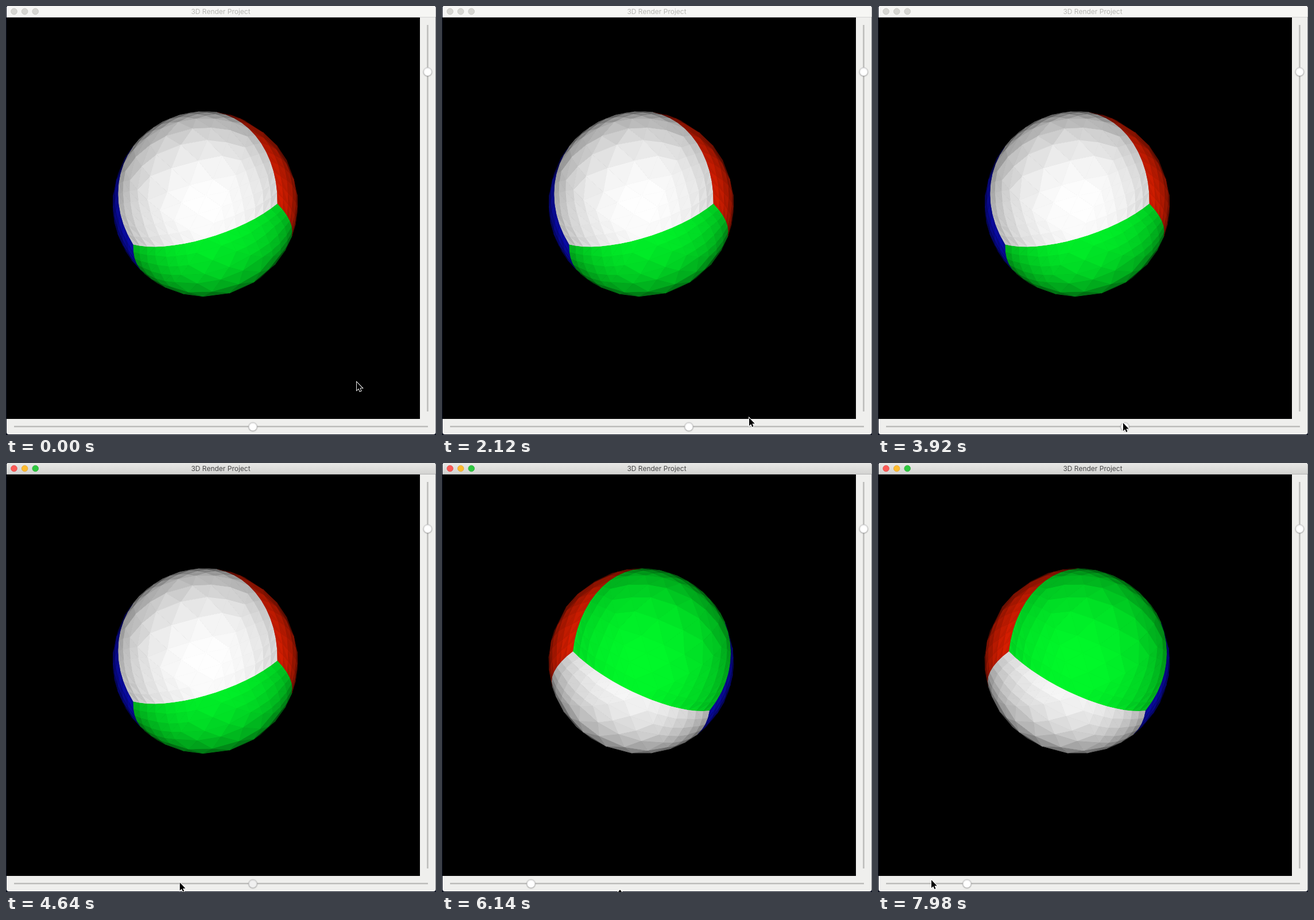
Write an HTML page with a canvas that moves like this. It is 749 by 747 pixels and loops after 8000 ms.

```html
<!DOCTYPE html>
<html lang="en">
<head>
<meta charset="utf-8">
<title>3D Render Project</title>
<style>
  html, body { margin: 0; width: 100%; height: 100%; overflow: hidden; background: #000; }
  canvas { display: block; }
</style>
</head>
<body>
<canvas id="stage" width="749" height="747"></canvas>
<script>
const ctx = document.getElementById('stage').getContext('2d');
const LOOP = 8000, ACTIVATE = 4020, TURN = 5980;
const RADIUS = 161, CENTER = { x: 347, y: 344.8 };
const PITCH = 68;
const WHITE = [255, 255, 255], GREEN = [0, 250, 42], RED = [255, 36, 0], BLUE = [14, 16, 232];

// --- sphere: a tetrahedron split four times, each time pushed out to the sphere
const unit = v => { const l = Math.hypot(...v); return v.map(c => c / l); };
const middle = (a, b) => unit(a.map((c, i) => c + b[i]));

function inflate(faces) {
  return faces.flatMap(({ p: [a, b, c], color }) => {
    const ab = middle(a, b), bc = middle(b, c), ca = middle(c, a);
    return [[a, ab, ca], [b, bc, ab], [c, ca, bc], [ab, bc, ca]].map(p => ({ p, color }));
  });
}

const [A, B, C, D] = [[1, 1, 1], [-1, -1, 1], [-1, 1, -1], [1, -1, -1]].map(unit);
let faces = [
  { p: [A, B, C], color: GREEN },
  { p: [A, C, D], color: WHITE },
  { p: [B, C, D], color: RED },
  { p: [A, B, D], color: BLUE }
];
for (let i = 0; i < 4; i++) faces = inflate(faces);

function rotation(heading, pitch) {
  const h = heading * Math.PI / 180, p = pitch * Math.PI / 180;
  const ch = Math.cos(h), sh = Math.sin(h), cp = Math.cos(p), sp = Math.sin(p);
  return ([x, y, z]) => {
    const depth = z * ch - x * sh;
    return [x * ch + z * sh, y * cp - depth * sp, y * sp + depth * cp];
  };
}

function normal([a, b, c]) {
  const u = b.map((v, i) => v - a[i]), w = c.map((v, i) => v - a[i]);
  const n = unit([u[1] * w[2] - u[2] * w[1], u[2] * w[0] - u[0] * w[2], u[0] * w[1] - u[1] * w[0]]);
  const outward = n[0] * a[0] + n[1] * a[1] + n[2] * a[2] > 0;
  return outward ? n : n.map(v => -v);
}

function facets(heading) {
  const rotate = rotation(heading, PITCH);
  return faces.flatMap(({ p, color }) => {
    const points = p.map(rotate);
    const facing = normal(points)[2];
    if (facing <= 0) return [];
    const shade = facing ** (1 / 2.4);
    const path = new Path2D();
    for (const [x, y] of points) path.lineTo(CENTER.x + x * RADIUS, CENTER.y + y * RADIUS);
    path.closePath();
    return [{ path, fill: `rgb(${color.map(c => Math.floor(c * shade))})` }];
  });
}

const before = facets(208), after = facets(70);

// Outlines go underneath so that no dark seams show between the fills.
function drawSphere(sphere) {
  ctx.lineWidth = 1;
  ctx.lineJoin = 'round';
  for (const { path, fill } of sphere) {
    ctx.strokeStyle = fill;
    ctx.stroke(path);
  }
  for (const { path, fill } of sphere) {
    ctx.fillStyle = fill;
    ctx.fill(path);
  }
}

// --- window
function rect(x, y, w, h, fill) {
  ctx.fillStyle = fill;
  ctx.fillRect(x, y, w, h);
}

function disc(x, y, r, fill, edge) {
  ctx.beginPath();
  ctx.arc(x, y, r, 0, 7);
  ctx.fillStyle = fill;
  ctx.fill();
  ctx.lineWidth = 0.8;
  ctx.strokeStyle = edge;
  ctx.stroke();
}

function thumb(x, y, fill) {
  ctx.save();
  ctx.shadowColor = 'rgba(0,0,0,.3)';
  ctx.shadowBlur = 2;
  ctx.shadowOffsetY = 0.6;
  disc(x, y, 7.2, fill, '#c9c9c9');
  ctx.restore();
}

function drawWindow(active, thumbX, pressed) {
  rect(0, 0, 749, 747, '#0b1020');
  ctx.beginPath();
  ctx.roundRect(1, 0, 747.5, 746, [3, 3, 4, 4]);
  ctx.fillStyle = '#efefed';
  ctx.fill();

  const bar = ctx.createLinearGradient(0, 0, 0, 19);
  bar.addColorStop(0, active ? '#e8e8e6' : '#f6f6f4');
  bar.addColorStop(1, active ? '#d3d3d1' : '#f6f6f4');
  ctx.beginPath();
  ctx.roundRect(1, 0, 747.5, 19, [3, 3, 0, 0]);
  ctx.fillStyle = bar;
  ctx.fill();
  rect(1, 19, 747, 1, active ? '#b4b4b4' : '#d4d4d4');

  const lights = active
    ? [['#fc5b57', '#df4744'], ['#fdbb2e', '#dea034'], ['#2ec840', '#27aa35']]
    : Array(3).fill(['#d6d6d2', '#c2c2be']);
  lights.forEach(([fill, edge], i) => disc(14 + i * 18.6, 9.5, 5.3, fill, edge));

  ctx.font = '12px Inter, sans-serif';
  ctx.textAlign = 'center';
  ctx.fillStyle = active ? '#484848' : '#b6b6b2';
  ctx.fillText('3D Render Project', 374, 14);

  rect(1, 20, 720, 699, '#000');
  rect(14, 731, 721, 2.5, '#bcbcba');
  rect(733.2, 33, 2.5, 673, '#bcbcba');
  thumb(734.5, 114.5, '#fff');
  thumb(thumbX, 732.5, pressed ? '#f0f0f0' : '#fff');
}

// --- pointer: time, x, y of the tip
const path = [
  [0, 611, 655], [1640, 611, 655], [2120, 535, 717], [3000, 428, 727], [3920, 427, 726],
  [4120, 427, 726], [5480, 48, 740], [6140, 310, 743], [7120, 433, 738.5], [7980, 93, 726], [8000, 93, 726]
];

function pointerAt(t) {
  const i = path.findIndex(k => k[0] > t);
  const [t0, x0, y0] = path[i - 1], [t1, x1, y1] = path[i];
  const u = (t - t0) / (t1 - t0), e = u * u * (3 - 2 * u);
  return [x0 + (x1 - x0) * e, y0 + (y1 - y0) * e];
}

const arrow = new Path2D('M0 0V14L3.2 11L5.4 16L7.5 15.1L5.4 10.2H9.8Z');
const resize = new Path2D('M0 0L3.4 4H1V12H3.4L0 16L-3.4 12H-1V4H-3.4Z');

function drawPointer(t) {
  const [x, y] = pointerAt(t);
  const shape = t > 5900 && t < 7450 ? resize : arrow;
  ctx.save();
  ctx.translate(x, y);
  ctx.lineWidth = 1.8;
  ctx.lineJoin = 'miter';
  ctx.strokeStyle = '#fff';
  ctx.stroke(shape);
  ctx.fillStyle = '#000';
  ctx.fill(shape);
  ctx.restore();
}

function frame() {
  const t = performance.now() % LOOP;
  const turned = t >= TURN;
  drawWindow(t >= ACTIVATE, turned ? 155 : 430, t >= ACTIVATE && !turned);
  drawSphere(turned ? after : before);
  drawPointer(t);
  requestAnimationFrame(frame);
}
frame();
</script>
</body>
</html>
```
